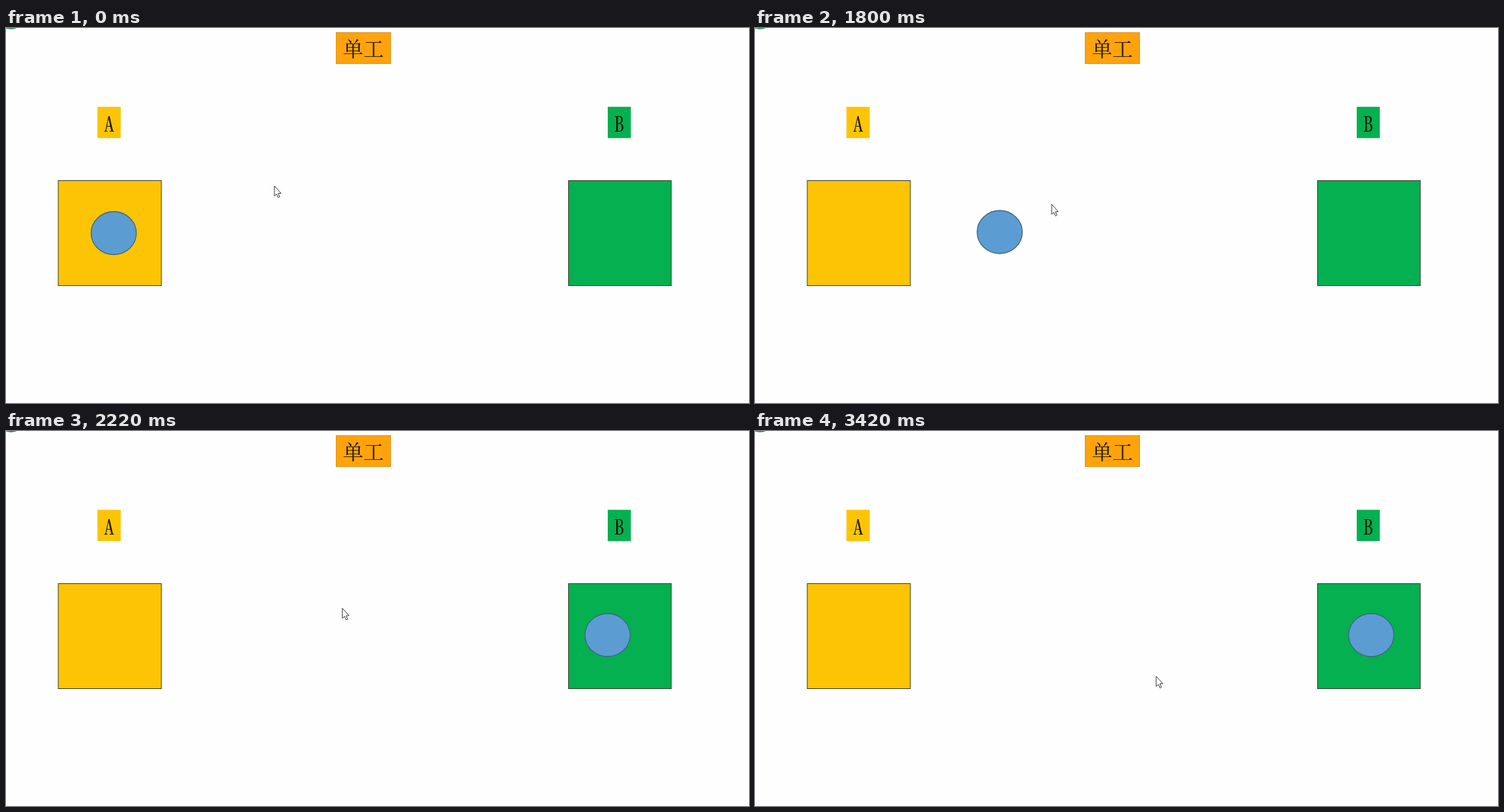
Write an HTML page that moves like this. It is 1052 by 532 pixels and loops after 4.08 s.

```html
<!DOCTYPE html>
<html lang="zh-CN">
<head>
<meta charset="utf-8">
<title>单工</title>
<style>
  html, body { margin: 0; width: 100%; height: 100%; overflow: hidden; background: #fefefe; }
  svg { display: block; width: 1052px; height: 532px; }
  text {
    font: 300 29px "Noto Serif CJK SC", "Noto Sans CJK SC", "Noto Sans CJK", serif;
    fill: #1c160c;
    text-anchor: middle;
  }
  .letter { font-feature-settings: "hwid"; }
  .amber { fill: #fcc404; }
  .green { fill: #04b04f; }
  .box { stroke: #38402c; stroke-width: 1; }
</style>
</head>
<body>
<svg viewBox="0 0 1052 532">
  <ellipse cx="7" cy="-19" rx="20" ry="20" fill="#5fa88c" stroke="#25805c" stroke-width="1.5"/>

  <rect x="467.5" y="6.5" width="77" height="44" fill="#ffa30c" stroke="#e0951d"/>
  <text x="506" y="41">单工</text>

  <rect class="amber" x="129.5" y="111.8" width="33" height="44.4"/>
  <text class="letter" x="146" y="147">A</text>
  <rect class="green" x="852" y="111.8" width="32.7" height="44.4"/>
  <text class="letter" x="868" y="147">B</text>

  <rect class="amber box" x="74" y="216.5" width="146" height="149"/>
  <rect class="green box" x="796.5" y="216.5" width="145.5" height="149"/>

  <ellipse id="ball" rx="32" ry="30.5" fill="#5b9dd3" stroke="#41677f" stroke-width="1.3"/>
  <path id="cursor" d="M0 0V14.4L3.2 11.5 5.4 16.6 7.6 15.6 5.4 10.7 9.4 10.4Z"
        fill="#fff" stroke="#3c3c3c" stroke-width="1"/>
</svg>
<script>
  const LOOP = 4080, STEP = 60;

  const linear = p => p;
  const speedUp = p => p ** 1.5;
  const slowDown = p => 1 - (1 - p) ** 2;

  // Each move runs from one time to another and ends at x, y; between moves the part rests.
  const move = (from, to, x, y, ease = linear) => ({ from, to, x, y, ease });

  const parts = [
    {
      el: document.getElementById("ball"), x: 152.5, y: 291,
      moves: [
        move(1380, 1560, 184.5, 289.5, speedUp),
        move(1560, 1800, 346.5, 289.5, speedUp),
        move(1800, 2100, 789.5, 289.5),
        move(2100, 2340, 872.5, 289.5, slowDown)
      ]
    },
    {
      el: document.getElementById("cursor"), x: 380, y: 224,
      moves: [
        move(1140, 1260, 382, 219),
        move(1680, 1800, 420, 250),
        move(1800, 2100, 363, 255),
        move(2100, 2400, 646, 246),
        move(2520, 2580, 618, 260),
        move(2580, 2640, 606, 258),
        move(2760, 2940, 590, 257),
        move(3300, 3420, 568, 348)
      ]
    }
  ];

  function pose({ x, y, moves }, t) {
    for (const m of moves) {
      if (t <= m.from) break;
      const p = m.ease(Math.min(1, (t - m.from) / (m.to - m.from)));
      x += (m.x - x) * p;
      y += (m.y - y) * p;
    }
    return `translate(${x} ${y})`;
  }

  function draw() {
    // The picture advances in fixed steps.
    const t = Math.floor(performance.now() % LOOP / STEP) * STEP;
    for (const part of parts) part.el.setAttribute("transform", pose(part, t));
    requestAnimationFrame(draw);
  }
  draw();
</script>
</body>
</html>
```
